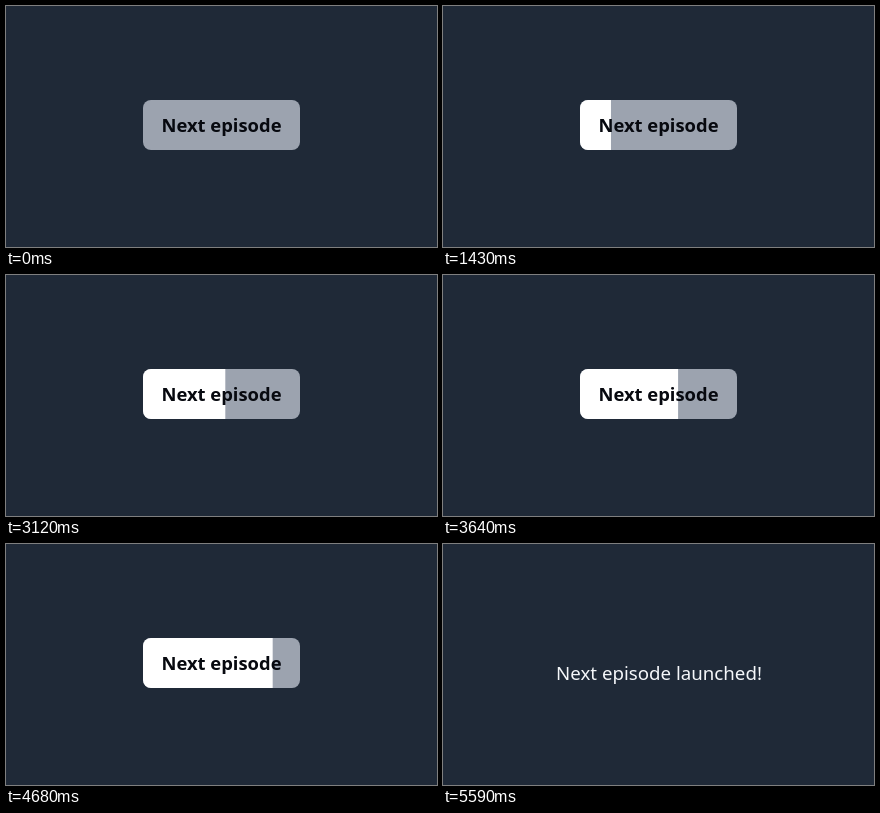
An HTML page that plays this animation: 431 by 241 pixels, repeating every 6760 ms.

```html
<!DOCTYPE html>
<html lang="en">
<head>
<meta charset="utf-8">
<title>Next episode</title>
<style>
  html, body { margin: 0; width: 100%; height: 100%; overflow: hidden; background: #1f2937; }
  svg { display: block; width: 100%; height: 100%; }
  text { font-family: "Noto Sans", "Open Sans", sans-serif; text-anchor: middle; }
  .label { font-size: 18.4px; font-weight: 600; fill: #07090f; }
  .message { font-size: 18.7px; fill: #f5f7fa; }
</style>
</head>
<body>
<svg viewBox="0 0 431 241">
  <clipPath id="shape"><rect x="137" y="94" width="157" height="50" rx="8"/></clipPath>
  <rect width="431" height="241" fill="#1f2937"/>
  <g id="button">
    <g clip-path="url(#shape)">
      <rect x="137" y="94" width="157" height="50" fill="#9ca3af"/>
      <rect id="fill" x="137" y="94" height="50" fill="#fff"/>
    </g>
    <text class="label" x="215.5" y="126">Next episode</text>
  </g>
  <text id="message" class="message" x="216" y="136">Next episode launched!</text>
</svg>
<script>
  const LOOP = 6760, STEP = 130, START = 410, LAUNCH = 5590;
  const WIDTH = 157, SPEED = WIDTH / 5170;
  const [button, fill, message] =
    ["button", "fill", "message"].map(id => document.getElementById(id));

  function render(ms) {
    const t = Math.floor((ms % LOOP) / STEP) * STEP;
    const launched = t >= LAUNCH;
    const progress = t < 520 ? 0 : Math.min(WIDTH, (t - START) * SPEED);
    fill.setAttribute("width", progress.toFixed(2));
    button.style.display = launched ? "none" : "";
    message.style.display = launched ? "" : "none";
  }

  const origin = performance.now();
  function tick() {
    render(performance.now() - origin);
    requestAnimationFrame(tick);
  }
  tick();
</script>
</body>
</html>
```
